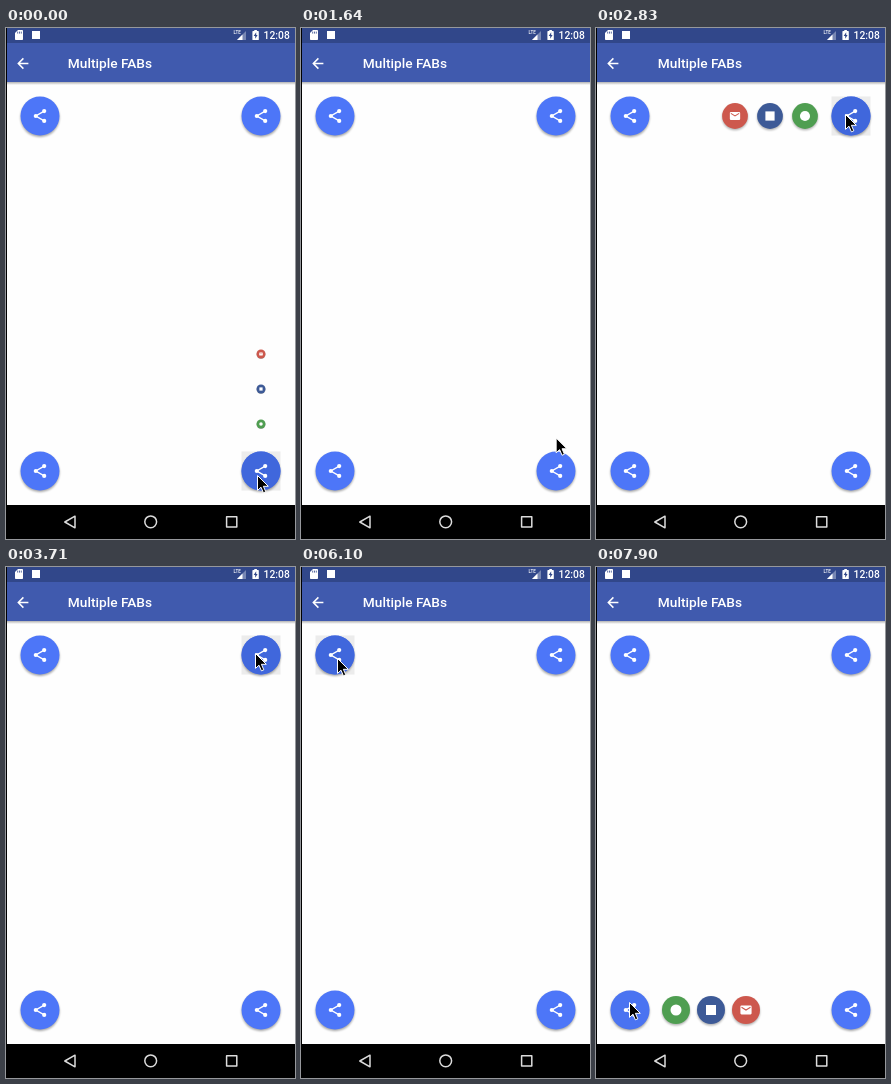
An HTML page for the animation above (8000 ms loop, 289 by 511 pixels).

```html
<!DOCTYPE html>
<html lang="en">
<head>
<meta charset="utf-8">
<title>Multiple FABs</title>
<style>
  html, body { margin: 0; width: 100%; height: 100%; overflow: hidden; background: #fefefe; }
  svg { display: block; width: 100vw; height: 100vh; }
  text { font-family: Roboto, "Open Sans", sans-serif; font-weight: 500; fill: #fff; }
</style>
</head>
<body>
<svg viewBox="0 0 289 511" preserveAspectRatio="none">
  <defs>
    <filter id="soft" x="-30%" y="-30%" width="160%" height="160%"><feGaussianBlur stdDeviation="1.3"/></filter>
    <linearGradient id="drop" x2="0" y2="1">
      <stop offset="0" stop-opacity=".3"/><stop offset="1" stop-opacity="0"/>
    </linearGradient>
    <g id="share" fill="#fff" stroke="#fff">
      <path d="M4.2-4.9L-4.2 0L4.2 4.9" fill="none" stroke-width="1.4"/>
      <g stroke="none"><circle cx="4.2" cy="-4.9" r="2.1"/><circle cx="-4.2" r="2.1"/><circle cx="4.2" cy="4.9" r="2.1"/></g>
    </g>
    <g id="mail">
      <rect x="-5.6" y="-4.4" width="11.2" height="8.8" rx="1.1" fill="#fff"/>
      <path d="M-4.5-2.8L0 0L4.5-2.8" fill="none" stroke="#cd584d" stroke-width="1.1"/>
    </g>
    <rect id="square" x="-5" y="-5" width="10" height="10" fill="#fff"/>
    <circle id="dot" r="5.5" fill="#fff"/>
  </defs>

  <rect width="289" height="511" fill="#fefefe"/>
  <rect y="54" width="289" height="3" fill="url(#drop)"/>
  <rect width="289" height="54" fill="#405aae"/>
  <rect width="289" height="15" fill="#31478a"/>

  <g fill="#fff">
    <path d="M12 2h4.2q.8 0 .8.8v8.4q0 .8-.8.8H9.8q-.8 0-.8-.8V5z"/>
    <path d="M11.7 3.6v2M13.5 3.6v2M15.3 3.6v2" stroke="#31478a" stroke-width=".8"/>
    <rect x="26" y="3" width="8" height="8"/>
    <path d="M240 3v9h-9z" opacity=".35"/>
    <path d="M236.5 6.5V12H231z"/>
    <path d="M248.3 2h2.6v1.1h1.3q.6 0 .6.6v7.7q0 .6-.6.6H247q-.6 0-.6-.6V3.7q0-.6.6-.6h1.3z"/>
    <path d="M250.2 4.3L247.7 8h1.5v2.8L251.6 7h-1.4z" fill="#31478a"/>
  </g>
  <text x="227.5" y="6.2" font-size="4.6">LTE</text>
  <text x="257.6" y="11" font-size="10.3">12:08</text>
  <path d="M22.4 35.5H12.6M17.4 30.4L12.3 35.5L17.4 40.6" fill="none" stroke="#fff" stroke-width="1.5"/>
  <text x="61.8" y="40.2" font-size="13.7">Multiple FABs</text>

  <g id="menus"></g>

  <rect y="477" width="289" height="34"/>
  <rect width="1" height="511"/>
  <g fill="none" stroke="#dcdcdc" stroke-width="1.5" stroke-linejoin="round">
    <path d="M69 488.2v11.6L58.8 494z"/>
    <circle cx="144.7" cy="493.8" r="5.9"/>
    <rect x="220.6" y="488.7" width="10.2" height="10.2"/>
  </g>

  <path id="cursor" d="M.5.5V15.4L4 12.2L6.4 17.8L8.8 16.8L6.4 11.3H11.3z" stroke="#fff" stroke-width="1" stroke-linejoin="round"/>
</svg>

<script>
const LOOP = 8000;
const MINIS = [["#4f9e51", "dot"], ["#3d5a97", "square"], ["#cd584d", "mail"]];

// press and scale hold [time, value] steps; dir and gap place the small buttons
const menus = [
  { x: 255, y: 443, dir: [0, -1], gap: 47,
    press: [[0, 1], [150, .8], [300, .6], [440, .35], [590, .15], [740, 0], [1040, 1], [1190, .6], [1340, 0]],
    scale: [[0, .32], [150, .92], [300, 1], [1190, .45], [1340, 0]] },
  { x: 255, y: 88, dir: [-1, 0], gap: 46,
    press: [[2680, .6], [2830, 1], [4010, 0]],
    scale: [[2680, .32], [2830, .92], [2980, 1], [3710, 0]] },
  { x: 34, y: 88, dir: [0, 1], gap: 45,
    press: [[5060, .15], [5210, .8], [5350, .4], [5650, 0], [6100, 1], [6400, 0]],
    scale: [[5060, .32], [5210, .92], [5350, 1], [6100, 0]] },
  { x: 34, y: 443, dir: [1, 0], gap: 46,
    press: [[7600, .3], [7750, .7], [7900, .25]],
    scale: [[7600, .32], [7750, .92], [7900, 1]] }
];

// cursor trips: start, end, sideways bow and the times of the visible steps
const trips = [
  { from: [251, 447], to: [249, 86], bow: 12, times: [1640, 1790, 1930, 2080, 2230] },
  { from: [249, 86], to: [36, 91], bow: 0, times: [4010, 4160, 4310, 4460, 4610, 4760] },
  { from: [36, 91], to: [33, 435], bow: 9, times: [6400, 6550, 6700, 6850, 7000] }
];

const $ = id => document.getElementById(id);
const ease = p => p * p * (3 - 2 * p);
const held = (steps, t) => steps.reduce((v, [at, next]) => t >= at ? next : v, 0);

const disc = (r, color, shade) =>
  `<circle cy="1.6" r="${r}" opacity="${shade}" filter="url(#soft)"/><circle r="${r}" fill="${color}"/>`;

$("menus").innerHTML = menus.map(m => `<g transform="translate(${m.x} ${m.y})">
  <rect class="veil" x="-19.5" y="-19.5" width="39" height="39" fill="#ececec"/>
  ${disc(19.5, "#4d76f8", .35)}
  <circle class="tint" r="19.5" fill="#4067dc"/>
  <use href="#share"/>
  ${MINIS.map(([color, icon]) => `<g class="mini">${disc(14, color, .3)}<use href="#${icon}"/></g>`).join("")}
</g>`).join("");

[...$("menus").children].forEach((g, i) => {
  const m = menus[i];
  m.veil = g.querySelector(".veil");
  m.tint = g.querySelector(".tint");
  m.minis = g.querySelectorAll(".mini");
});

function cursorAt(t) {
  let pos = trips[0].from;
  for (const { from, to, bow, times } of trips) {
    const n = times.filter(at => t >= at).length;
    if (!n) break;
    const p = ease(n / times.length);
    pos = from.map((a, k) => a + (to[k] - a) * p);
    pos[0] += bow * Math.sin(Math.PI * p);
  }
  return pos;
}

function draw(now) {
  const t = now % LOOP;
  for (const m of menus) {
    const press = held(m.press, t), scale = held(m.scale, t);
    m.veil.setAttribute("opacity", press);
    m.tint.setAttribute("opacity", press);
    m.minis.forEach((el, k) => {
      const d = m.gap + 35 * k;
      el.setAttribute("visibility", scale ? "visible" : "hidden");
      el.setAttribute("transform", `translate(${m.dir[0] * d} ${m.dir[1] * d}) scale(${scale})`);
    });
  }
  $("cursor").setAttribute("transform", `translate(${cursorAt(t)})`);
}

const start = performance.now();
function tick() {
  draw(performance.now() - start);
  requestAnimationFrame(tick);
}
tick();
</script>
</body>
</html>
```
